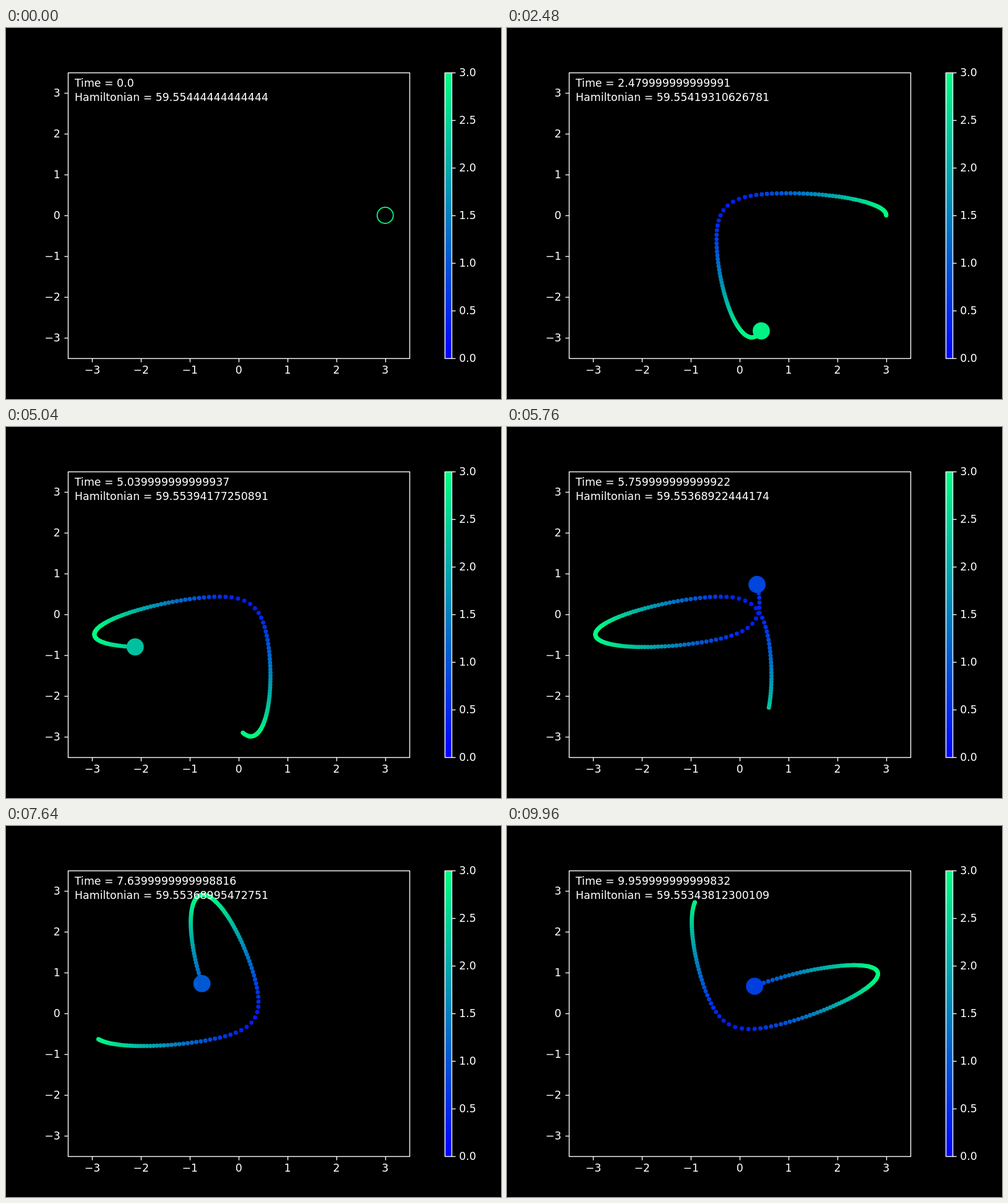
An HTML page with a canvas that plays this animation: 800x600 px, repeating every 10 s.

```html
<!DOCTYPE html>
<html lang="en">
<head>
<meta charset="utf-8">
<title>Orbit of a mass tied to a hanging weight</title>
<style>
  html, body { margin: 0; width: 100%; height: 100%; overflow: hidden; background: #000; }
  canvas { display: block; width: 800px; height: 600px; }
</style>
</head>
<body>
<canvas id="stage" width="800" height="600"></canvas>
<script>
const ctx = document.getElementById('stage').getContext('2d');
const PT = 125 / 72; // pixels per typographic point
const FONT = `${10 * PT}px "DejaVu Sans", sans-serif`;

// Mass m slides on a table, tied through a hole to a hanging mass M.
const M = 2, m = 2, g = 9.81, L = 5, DT = 0.01;

const FRAME_MS = 40, FRAMES = 250, SAMPLES_PER_FRAME = 2, TRAIL = 150;

const box = { left: 100, top: 72, width: 552.3, height: 462, limit: 3.5 };
const bar = { left: 708.6, right: 720, max: 3 };

const px = x => box.left + box.width * (x + box.limit) / (2 * box.limit);
const py = y => box.top + box.height * (box.limit - y) / (2 * box.limit);
const barY = v => box.top + box.height * (1 - v / bar.max);
const snap = v => Math.floor(v + 0.5) + 0.5;

function derivative([r, , pr]) {
  return [pr / (M + m), L / (m * r * r), L * L / (m * r ** 3) - M * g];
}

function rk4(state) {
  const shift = (k, h) => state.map((v, i) => v + h * k[i]);
  const k1 = derivative(state);
  const k2 = derivative(shift(k1, DT / 2));
  const k3 = derivative(shift(k2, DT / 2));
  const k4 = derivative(shift(k3, DT));
  return state.map((v, i) => v + DT / 6 * (k1[i] + 2 * k2[i] + 2 * k3[i] + k4[i]));
}

function energy([r, , pr]) {
  return pr * pr / (2 * (M + m)) + L * L / (2 * m * r * r) + M * g * r;
}

// Winter colour scale: blue to spring green.
function colour(r) {
  const v = Math.min(1, Math.max(0, r / bar.max));
  return `rgb(0, ${Math.round(255 * v)}, ${Math.round(255 * (1 - v / 2))})`;
}

function simulate() {
  const samples = [];
  let state = [3, 0, 0], time = 0;
  for (let i = 0; i < FRAMES * SAMPLES_PER_FRAME; i++) {
    const [r, theta] = state;
    samples.push({
      x: px(r * Math.cos(theta)),
      y: py(r * Math.sin(theta)),
      colour: colour(r),
      time,
      energy: energy(state)
    });
    for (let k = 0; k < 2; k++) {
      state = rk4(state);
      time += DT;
    }
  }
  return samples;
}

const samples = simulate();

function disc({ x, y, colour }, radius) {
  ctx.fillStyle = colour;
  ctx.beginPath();
  ctx.arc(x, y, radius, 0, 2 * Math.PI);
  ctx.fill();
}

function ring({ x, y, colour }, radius) {
  ctx.strokeStyle = colour;
  ctx.lineWidth = PT;
  ctx.beginPath();
  ctx.arc(x, y, radius, 0, 2 * Math.PI);
  ctx.stroke();
}

function line(x1, y1, x2, y2) {
  ctx.beginPath();
  ctx.moveTo(x1, y1);
  ctx.lineTo(x2, y2);
  ctx.stroke();
}

function label(text, x, y, align) {
  ctx.textAlign = align;
  ctx.fillText(text, x, y);
}

function frameRect(left, right) {
  const x = snap(left), y = snap(box.top);
  ctx.strokeRect(x, y, snap(right) - x, snap(box.top + box.height) - y);
}

function drawAxes() {
  const tick = 3.5 * PT, gap = 2 * tick, half = 6.3;
  const right = box.left + box.width, bottom = box.top + box.height;
  ctx.strokeStyle = ctx.fillStyle = '#fff';
  ctx.lineWidth = 0.8 * PT;
  ctx.font = FONT;
  ctx.textBaseline = 'alphabetic';

  for (let v = -3; v <= 3; v++) {
    const text = String(v).replace('-', '\u2212');
    const x = snap(px(v)), y = snap(py(v));
    line(x, bottom + 0.5, x, bottom + 0.5 + tick);
    label(text, px(v), bottom + gap + 13.2, 'center');
    line(box.left + 0.5, y, box.left + 0.5 - tick, y);
    label(text, box.left - gap, py(v) + half, 'right');
  }
  for (let v = 0; v <= bar.max; v += 0.5) {
    const y = snap(barY(v));
    line(bar.right + 0.5, y, bar.right + 0.5 + tick, y);
    label(v.toFixed(1), bar.right + gap, barY(v) + half, 'left');
  }
  frameRect(box.left, right);
  frameRect(bar.left, bar.right);
}

function drawBar() {
  const gradient = ctx.createLinearGradient(0, box.top + box.height, 0, box.top);
  gradient.addColorStop(0, colour(0));
  gradient.addColorStop(1, colour(bar.max));
  ctx.fillStyle = gradient;
  ctx.fillRect(bar.left, box.top, bar.right - bar.left, box.height);
}

const decimal = v => Number.isInteger(v) ? v.toFixed(1) : String(v);

function draw(frame) {
  const now = frame * SAMPLES_PER_FRAME, head = samples[now];
  ctx.fillStyle = '#000';
  ctx.fillRect(0, 0, 800, 600);
  drawBar();

  if (now === 0) {
    ring(head, 7.5 * PT);
  } else {
    for (let i = Math.max(0, now - TRAIL); i < now; i++) disc(samples[i], 2 * PT);
    disc(head, 8 * PT);
  }

  drawAxes();
  const textX = box.left + 0.02 * box.width;
  label(`Time = ${decimal(head.time)}`, textX, 95.1, 'left');
  label(`Hamiltonian = ${decimal(head.energy)}`, textX, 118.2, 'left');
}

function tick() {
  draw(Math.floor(performance.now() / FRAME_MS) % FRAMES);
  requestAnimationFrame(tick);
}
tick();
</script>
</body>
</html>
```
